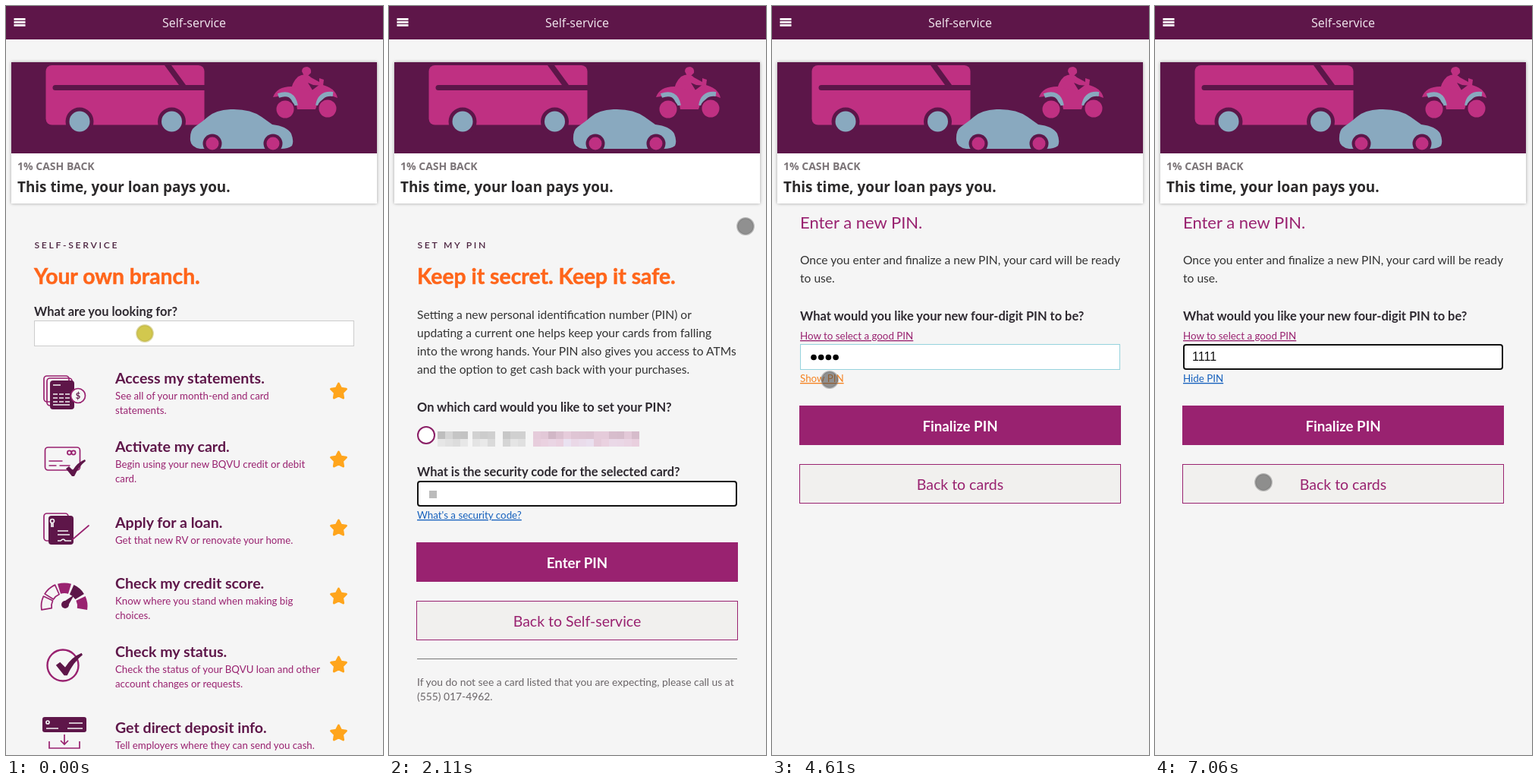
Recreate the animation shown at these times as an HTML page. Size 497 by 986 pixels, loop 7.59 s.

```html
<!DOCTYPE html>
<html lang="en">
<head>
<meta charset="utf-8">
<title>Self-service</title>
<style>
html, body { margin: 0; width: 100%; height: 100%; overflow: hidden; background: #f5f5f5; }
svg { display: block; width: 100%; height: 100%; }
text { font-family: Lato, sans-serif; font-size: 15.6px; fill: #333; }
.bar { font: 400 16px "Open Sans", sans-serif; fill: #f3eaf1; text-anchor: middle; }
.promo { font: 700 14px "Open Sans", sans-serif; fill: #7b7477; }
.claim { font: 700 18.9px "Open Sans", sans-serif; fill: #2c2a2b; }
.over { font-size: 12.2px; font-weight: 600; letter-spacing: 2.7px; fill: #4c2440; }
.h1 { font-size: 28.3px; font-weight: 700; fill: #ff651a; stroke: #ff651a; stroke-width: .5px; }
.h2 { font-size: 22px; fill: #992270; }
.label { font-size: 16.45px; font-weight: 700; fill: #2e2930; }
.title { font-size: 19.6px; font-weight: 700; fill: #5e1649; }
.desc { font-size: 13.25px; fill: #992270; }
.note { font-size: 13.85px; fill: #6a6568; }
.link { font-size: 13.35px; fill: #1560bd; text-decoration: underline; }
.plum { fill: #992270; }
.hot { fill: #f58220; }
.big { font-size: 15.3px; }
.btn { font-size: 18.7px; font-weight: 700; fill: #fff; text-anchor: middle; }
.back { font-size: 19.5px; fill: #992270; text-anchor: middle; }
.alert { font-size: 17.4px; font-weight: 700; fill: #111; }
.inline { font-size: 13.3px; font-weight: 700; fill: #2e2930; }
.typed { font: 16px "Liberation Sans", Arial, sans-serif; fill: #111; }
.field { fill: #fff; stroke: #ccc; x: .5px; y: .5px; width: 421px; height: 33px; }
.field.focus { stroke: #111; stroke-width: 2; rx: 3px; x: 1px; y: 1px; width: 420px; height: 32px; }
.field.fading { stroke: #96d3dd; }
.ring { fill: none; stroke: #5ba3dc; stroke-width: 2; }
.line { fill: none; stroke: #992270; stroke-width: 1.7; }
.dark { fill: #5e1649; }
.white { fill: none; stroke: #f5f5f5; stroke-width: 1.7; }
.dot { fill: #464646; fill-opacity: .58; stroke: #777; stroke-opacity: .45; stroke-width: 2.5; }
.dot.press { fill: #d2c84e; fill-opacity: 1; stroke: #b9ae45; }
</style>
</head>
<body>
<svg id="stage" viewBox="0 0 497 986" preserveAspectRatio="none"></svg>
<script>
const LOOP = 7590;
const PURPLE = '#5c1649', PINK = '#bf3082', BLUE = '#89a9bf';

const text = (x, y, s, cls = '', id = '') => `<text x="${x}" y="${y}" class="${cls}" id="${id}">${s}</text>`;
const rect = (x, y, w, h, attrs = '') => `<rect x="${x}" y="${y}" width="${w}" height="${h}" ${attrs}/>`;
const circle = (x, y, r, attrs = '') => `<circle cx="${x}" cy="${y}" r="${r}" ${attrs}/>`;
const path = (d, attrs = '') => `<path d="${d}" ${attrs}/>`;
const group = (body, attrs = '') => `<g ${attrs}>${body}</g>`;
const move = (x, y, body) => group(body, `transform="translate(${x} ${y})"`);
const range = n => [...Array(n).keys()];
const paragraph = (lines, y, gap, cls) => lines.map((s, i) => text(37, y + i * gap, s, cls)).join('');

const field = (id, y, body = '') => move(37, y, `<rect id="${id}" class="field"/>` + body);
const solidButton = (y, label, id) => rect(36, y, 424, 52, `id="${id}" fill="#992270"`) + text(248, y + 34, label, 'btn');
const backButton = (y, label) => rect(36.5, y + .5, 423, 51, 'fill="#f1f0ee" stroke="#992270"') + text(248, y + 34, label, 'back');

// Header and banner
const wheel = (x, y, r, gap, color) => circle(x, y, r + gap, `fill="${PURPLE}"`) + circle(x, y, r, `fill="${color}"`);
const bus = rect(52.5, 78, 209, 78.5, `rx="8" fill="${PINK}"`) +
  path('M209 78h9l19 26h-9z', `fill="${PURPLE}"`) +
  path('M262 104H65a3.5 3.5 0 0 0 0 7H262z', `fill="${PURPLE}"`) +
  wheel(97, 152, 13.5, 5, BLUE) + wheel(218.5, 152, 13.5, 5, BLUE);
const car = path('M243 177Q242 164 249 159Q258 153 266 146Q276 137 296 136Q322 135 337 146L351 156Q370 158 376 168Q380 178 377 184Q372 188 362 188H256Q244 186 243 177Z',
  `fill="${BLUE}"`) + wheel(272, 181, 8.5, 4, PINK) + wheel(352, 181, 8.5, 4, PINK);
const quad = path('M390 86Q390 80 397 80Q403 81 402 88L398 92H393Z', `fill="${PINK}"`) +
  path('M385 93Q395 87 402 94L413 100V95L419 97L418 105L405 104L398 101L406 114H375Q377 100 385 93Z', `fill="${PINK}"`) +
  path('M352 120Q357 106 376 106L402 112L414 103Q434 107 437 121L426 117Q412 121 408 136H384Q382 119 366 118Z', `fill="${PINK}"`) +
  path('M359 118Q378 111 382 131M411 131Q414 114 431 116', `fill="none" stroke="${BLUE}" stroke-width="6"`) +
  wheel(368, 136, 11.5, 2, PINK) + wheel(424, 135, 11.5, 2, PINK);
const top_ = rect(0, 0, 497, 44, 'fill="#5e1649"') +
  [16, 20, 24].map(y => rect(10.5, y, 15, 2.8, 'fill="#fff"')).join('') +
  text(248, 28, 'Self-service', 'bar') +
  rect(7, 74, 482, 186, 'fill="#fff" style="filter:drop-shadow(0 0 2px #0005)"') +
  rect(7, 74, 482, 120, `fill="${PURPLE}"`) + bus + car + quad +
  text(15, 216, '1% CASH BACK', 'promo') + text(15, 245, 'This time, your loan pays you.', 'claim');

// Icons are drawn around the vertical centre of their row
const tick = (x, y, s) => path('M-9-9l4-3l5 5q6-10 16-14l1 2q-9 7-15 20h-3z', `class="dark" transform="translate(${x} ${y}) scale(${s})"`);
const card = (x, y) => rect(x, y, 46, 30, 'rx="4" class="line"') +
  circle(x + 32, y + 7, 2.6, 'class="line"') + circle(x + 37.5, y + 7, 2.6, 'class="line"') +
  path(`M${x + 5} ${y + 18}h18M${x + 5} ${y + 24}h10m4 0h14`, 'class="line"');
const wedge = (i, attrs) => {
  const at = (a, r) => `${(77 + r * Math.cos(a)).toFixed(1)} ${(13 + r * Math.sin(a)).toFixed(1)}`;
  const a = Math.PI * (.93 + .228 * i) + .06, b = a + Math.PI * .228 - .12;
  return path(`M${at(a, 30.5)}A30.5 30.5 0 0 1 ${at(b, 30.5)}L${at(b, 17)}A17 17 0 0 0 ${at(a, 17)}Z`, attrs + ' stroke-linejoin="round"');
};
const icons = {
  statements: rect(50, -20, 33, 34, 'rx="4" class="line"') + rect(54, -17, 33, 36, 'rx="4" fill="#f5f5f5" class="line"') +
    rect(58, -14, 32, 38, 'rx="4" class="dark"') +
    path('M62-8h10M62 4h6m2 0h6m2 0h6M62 9h6m2 0h6m2 0h6M62 14h6m2 0h6m2 0h6M62 18h22', 'class="white"') +
    circle(95, 6, 9.5, 'fill="#f5f5f5" stroke="#992270" stroke-width="1.7"') +
    '<text x="95" y="10" text-anchor="middle" style="font-size:11px;font-weight:700;fill:#5e1649">$</text>',
  activate: card(51.5, -16) + tick(88, 21, 1),
  loan: rect(50, -19, 32, 36, 'rx="4" class="line"') + rect(56, -16, 33, 38, 'rx="4" class="dark"') +
    circle(61, -9, 2.5, 'class="white"') + path('M60-6v5m2-5v5M68 4h14M68 9h16M68 17h4q4-4 6 0h8', 'class="white"') +
    path('M88 15L109-3', 'class="line" stroke-linecap="round"'),
  score: range(5).map(i => wedge(i, i < 2 ? 'class="line"' : `fill="${i === 3 ? PURPLE : '#992270'}"`)).join('') +
    circle(78, 11, 5, 'class="dark"') + path('M75 8L90-2L81 14Z', 'class="dark"'),
  status: circle(75, 1, 20.5, 'class="line" style="stroke-width:2.4"') + tick(78, 13, 1.35),
  deposit: rect(48, -21, 58, 20, 'rx="3" class="dark"') + circle(55, -14, 2, 'class="white"') +
    path('M53-6h16m12 0h20M83-13h18', 'class="white"') +
    path('M57 11v9h40v-9M77 2v13m-5-5l5 5l5-5', 'class="line"'),
  pin: card(49.5, -20) + rect(84, -7, 16, 23, 'rx="2" class="dark"') +
    range(12).map(i => rect(86.5 + i % 3 * 4, -4 + (i / 3 | 0) * 5, 2.6, 2.6, 'fill="#f5f5f5"')).join('') +
    path('M93 3q3-2 4 1v6l6 2q3 2 1 8l-2 3h-7l-6-9l4 1z', 'fill="#992270" stroke="#f5f5f5" stroke-width=".8"')
};
const starPoints = range(10).map(i => {
  const r = i % 2 ? 5.3 : 10.4, a = (i * 36 - 90) * Math.PI / 180;
  return `${(438.5 + r * Math.cos(a)).toFixed(1)},${(.5 + r * Math.sin(a)).toFixed(1)}`;
}).join(' ');
const star = `<polygon points="${starPoints}" fill="#ffa51c" stroke="#ffa51c" stroke-width="3" stroke-linejoin="round"/>`;

const rows = {
  statements: ['Access my statements.', 'See all of your month-end and card', 'statements.'],
  activate: ['Activate my card.', 'Begin using your new BQVU credit or debit', 'card.'],
  loan: ['Apply for a loan.', 'Get that new RV or renovate your home.'],
  score: ['Check my credit score.', 'Know where you stand when making big', 'choices.'],
  status: ['Check my status.', 'Check the status of your BQVU loan and other', 'account changes or requests.'],
  deposit: ['Get direct deposit info.', 'Tell employers where they can send you cash.'],
  pin: ['Set my PIN.', 'Set your PIN for a new or current card.']
};
const list = (id, names) => group(names.map((name, i) => {
  const [title, ...lines] = rows[name], y = lines.length > 1 ? -10 : 0;
  return move(0, 507 + 90 * i, icons[name] + text(144, y, title, 'title') +
    lines.map((s, k) => text(144, y + 21 + 19 * k, s, 'desc')).join('') + star);
}).join(''), `id="${id}"`);

const searchPage = text(37.5, 319, 'SELF-SERVICE', 'over') + text(37, 366, 'Your own branch.', 'h1') +
  text(37, 408, 'What are you looking for?', 'label') +
  field('search', 414, text(12, 22, '', 'typed', 'query') + rect(39, 8, 1, 17, 'id="queryCaret"')) +
  list('allRows', ['statements', 'activate', 'loan', 'score', 'status', 'deposit']) + list('pinRows', ['activate', 'pin']);

// Blurred card number
let seed = 7;
const random = () => (seed = seed * 16807 % 2147483647) / 2147483647;
const mosaic = [[65, 4], [111, 3], [151, 3], [191, 14]].map(([x, n]) => range(n * 2).map(i => {
  const low = i >= n, v = (low ? 212 : 190) + random() * 26 | 0;
  const color = n > 4 ? `rgb(${Math.min(v + 16, 234)},${v - 10},${v + 5})` : `rgb(${v},${v},${v})`;
  return rect(x + i % n * 10, low ? 569 : 559, 10, 10, `fill="${color}"`);
}).join('')).join('');

const cardPage = text(37.5, 319, 'SET MY PIN', 'over') + text(37, 366, 'Keep it secret. Keep it safe.', 'h1') +
  paragraph(['Setting a new personal identification number (PIN) or', 'updating a current one helps keep your cards from falling',
    'into the wrong hands. Your PIN also gives you access to ATMs', 'and the option to get cash back with your purchases.'], 412, 24) +
  text(37, 534, 'On which card would you like to set your PIN?', 'label') +
  circle(49, 565, 11, 'fill="#fff" stroke="#8a1f66" stroke-width="2"') + circle(49, 565, 6, 'id="radio" fill="#8a1f66"') +
  group(mosaic, 'id="mosaic"') +
  text(37, 619, 'What is the security code for the selected card?', 'label') +
  field('code', 625, range(3).map(i => rect(16 + 10 * i, 13, 10, 10, `id="code${i}" fill="${['#bbb', '#a8a8a8', '#b4b4b4'][i]}"`)).join('')) +
  text(37, 675, 'What\'s a security code?', 'link') + solidButton(706, 'Enter PIN', 'enter') +
  rect(35, 705, 426, 54, 'class="ring" id="enterRing"') + backButton(783, 'Back to Self-service') +
  rect(37, 859, 422, 1, 'fill="#777"') +
  paragraph(['If you do not see a card listed that you are expecting, please call us at', '(555) 017-4962.'], 895, 19, 'note');

const newPinPage = text(37, 293, 'Enter a new PIN.', 'h2') +
  paragraph(['Once you enter and finalize a new PIN, your card will be ready', 'to use.'], 340, 24) +
  group(rect(38, 406, 420, 96, 'fill="#ffeef1" stroke="#c4083a" stroke-width="2"') +
    text(54, 439, 'You\'ll need to fix these errors:', 'alert') + circle(78, 464.5, 3, 'fill="#111"') +
    text(94, 470, 'You need to enter a new PIN.', 'link big') +
    rect(37.5, 617.5, 421, 24, 'fill="#ffeef1" stroke="#b3123f"') +
    text(48, 635, 'You need to enter a new PIN.', 'inline'), 'id="errors"') +
  group(text(37, 414, 'What would you like your new four-digit PIN to be?', 'label') +
    text(37, 439, 'How to select a good PIN', 'link plum') +
    field('pinField', 445, text(12, 22, '', 'typed', 'digits') + rect(0, 8, 1, 17, 'id="pinCaret"') +
      range(4).map(i => circle(18 + 9.7 * i, 17.5, 3.8, `id="bullet${i}"`)).join('')), 'id="pinEntry"') +
  group(text(37, 495, 'Show PIN', 'link', 'toggle') + solidButton(526, 'Finalize PIN', 'finalize') +
    rect(35, 525, 426, 54, 'class="ring" id="finalizeRing"') + backButton(603, 'Back to cards'), 'id="pinActions"');

const page = (id, body) => group(body, `id="${id}" clip-path="url(#reveal)"`);
const cross = path('M0-7l3 3.5h-2v2.5h2.5v-2l3.5 3l-3.5 3v-2h-2.5v2.5h2l-3 3.5l-3-3.5h2v-2.5h-2.5v2l-3.5-3l3.5-3v2h2.5v-2.5h-2z',
  'id="cross" fill="#2d0f26"');
document.getElementById('stage').innerHTML =
  `<defs><clipPath id="reveal">${rect(0, 262, 497, 724, 'id="revealBox"')}</clipPath></defs>` +
  page('searchPage', searchPage) + page('cardPage', cardPage) + page('newPinPage', newPinPage) + top_ +
  group(circle(0, 0, 10.7, 'id="dot" class="dot"') + cross, 'id="cursor"');

const el = {};
document.querySelectorAll('[id]').forEach(e => { if (e.id) el[e.id] = e; });

// Timeline
const between = (t, a, b) => t >= a && t < b;
const step = (t, keys) => keys.reduce((value, [at, next]) => t >= at ? next : value, keys[0][1]);
const swing = p => .5 - Math.cos(Math.PI * p) / 2;
const slides = [[830, 1027, 986, 290], [1027, 1467, 300, 929], [3572, 3872, 930, 300], [3880, 4150, 265, 670]];
const cursorPath = [[0, 183, 431], [680, 183, 431], [815, 157, 625], [1720, 157, 625], [1790, 470, 290], [2300, 470, 290],
  [2600, 49, 565], [2930, 49, 565], [3200, 248, 733], [4150, 248, 733], [4340, 76, 492], [5159, 76, 492], [5160, 133, 542],
  [6159, 133, 542], [6160, 361, 470], [6229, 361, 470], [6230, 143, 627], [LOOP, 143, 627]];
const presses = [[0, 70], [820, 890], [1650, 1720], [2650, 2720], [3270, 3340], [4540, 4610], [5550, 5700], [7000, 7060]];
const queryKeys = [[0, ''], [140, 'P'], [210, 'PI'], [280, 'PIN']];
const digitKeys = [[0, ''], [4680, '1111'], [4960, '111'], [5020, '11'], [5160, '1'], [5350, ''],
  [6160, '1'], [6230, '11'], [6570, '111'], [6710, '1111']];

const show = (id, on) => { el[id].style.display = on ? '' : 'none'; };
const shift = (id, x, y) => el[id].setAttribute('transform', `translate(${x} ${y})`);
const fieldState = (id, state) => el[id].setAttribute('class', 'field ' + state);

function cursorAt(t) {
  const i = Math.max(1, cursorPath.findIndex(k => k[0] > t));
  const [a, x, y] = cursorPath[i - 1], [b, u, v] = cursorPath[i];
  const p = (t - a) / (b - a);
  return [x + (u - x) * p, y + (v - y) * p];
}

function render(t) {
  show('searchPage', t < 1027);
  show('cardPage', between(t, 1027, 3876));
  show('newPinPage', t >= 3876);
  const slide = slides.find(([a, b]) => between(t, a, b));
  const bottom = slide ? slide[2] + (slide[3] - slide[2]) * swing((t - slide[0]) / (slide[1] - slide[0])) : 986;
  el.revealBox.setAttribute('height', Math.max(0, Math.round(bottom) - 262));

  el.query.textContent = step(t, queryKeys);
  fieldState('search', t >= 70 ? 'focus' : '');
  show('queryCaret', t >= 550);
  show('allRows', t < 280);
  show('pinRows', t >= 280);

  fieldState('code', t >= 1720 ? 'focus' : '');
  for (let i = 0; i < 3; i++) show('code' + i, t >= 2110 + 70 * i);
  show('radio', t >= 2860);
  shift('mosaic', t >= 1650 ? -1 : 0, t >= 1650 ? 1 : 0);
  show('enterRing', t >= 3340);

  const failed = between(t, 5700, 6570), pressed = between(t, 5700, 5950);
  const digits = step(t, digitKeys);
  show('errors', failed);
  shift('pinEntry', 0, failed ? 138 : 0);
  shift('pinActions', 0, failed ? 163 : 0);
  fieldState('pinField', step(t, [[0, ''], [4150, 'focus'], [4540, 'fading'], [4680, ''], [4890, 'focus'], [5550, ''], [5950, 'focus']]));
  el.digits.textContent = digits;
  for (let i = 0; i < 4; i++) show('bullet' + i, between(t, 4200 + 70 * i, 4680));
  show('pinCaret', between(t, 4890, 5550) || between(t, 5950, 7000));
  el.pinCaret.setAttribute('x', 13 + 8.9 * digits.length - (digits.length > 3 ? 3 : 0));
  el.toggle.textContent = t < 4680 ? 'Show PIN' : 'Hide PIN';
  el.toggle.setAttribute('class', between(t, 4540, 4820) ? 'link hot' : 'link');
  el.finalize.setAttribute('fill', pressed ? '#821c60' : '#992270');
  show('finalizeRing', pressed);

  shift('cursor', ...cursorAt(t));
  const crossed = between(t, 550, 680);
  show('cross', crossed);
  show('dot', !crossed && !between(t, 5160, 5350));
  el.dot.setAttribute('class', presses.some(([a, b]) => between(t, a, b)) ? 'dot press' : 'dot');
}

function frame() {
  render(performance.now() % LOOP);
  requestAnimationFrame(frame);
}
render(0);
requestAnimationFrame(frame);
</script>
</body>
</html>
```
